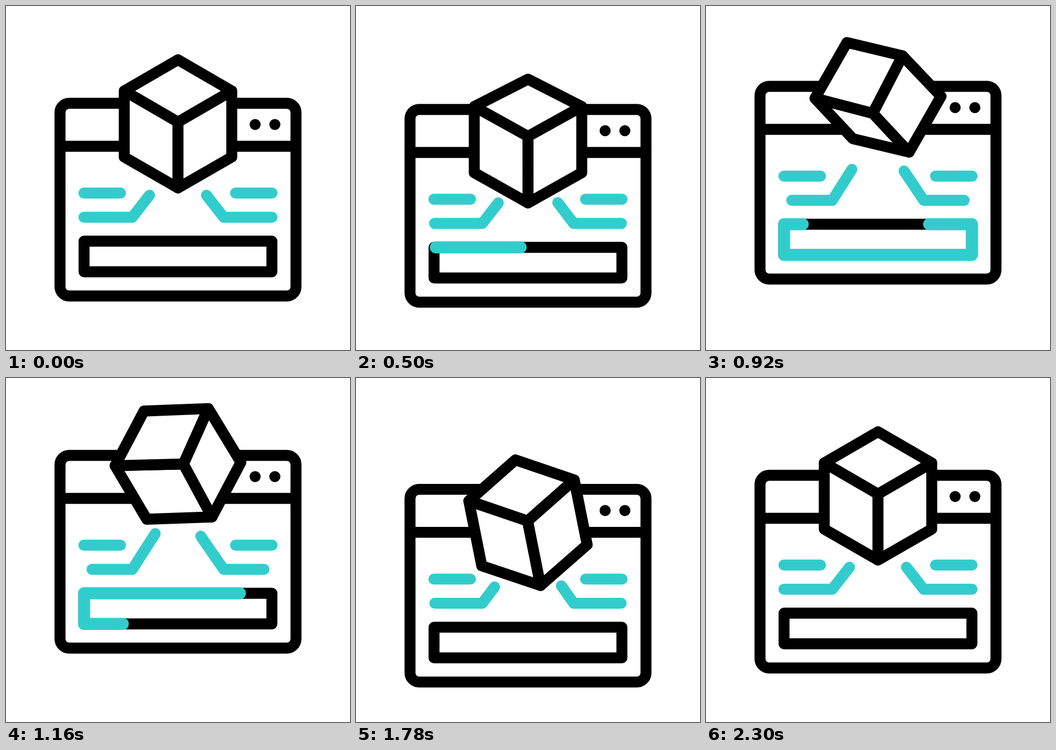
These frames come from a looping animation (640 by 640 pixels, 2800 ms). An HTML page with a canvas:

```html
<!DOCTYPE html>
<html lang="en">
<head>
<meta charset="utf-8">
<title>Jumping cube</title>
<style>
  html, body { margin: 0; width: 100%; height: 100%; overflow: hidden; background: #fff; }
  canvas { display: block; width: 640px; height: 640px; }
</style>
</head>
<body>
<canvas id="stage" width="640" height="640"></canvas>
<script>
const ctx = document.getElementById('stage').getContext('2d');
const LOOP = 2800, STEP = 20, BLACK = '#000', TEAL = '#33cccc', THICK = 20.4;
const lerp = (a, b, k) => a + (b - a) * k;
const part = (t, from, to) => Math.min(1, Math.max(0, (t - from) / (to - from)));
const ramp = (t, from, to) => (1 - Math.cos(Math.PI * part(t, from, to))) / 2;
const launch = (t, from) => 1 - Math.exp(-Math.max(0, t - from) / 232);

// Crouch, leap, hang, drop, dip and rest; lag delays the turning points
function hop(t, low, high, dip, lag) {
  const leap = low + high;
  return low * ramp(t, 200, 410 + lag)
    - leap * launch(t, 410 + lag)
    + leap * ramp(t, 1480 + lag, 1700 + lag)
    - (low + dip) * ramp(t, 1700 + lag, 1970 + lag)
    + dip * ramp(t, 1970 + lag, 2300);
}

const windowY = t => hop(t, 36, 40, 14, 0);
const cubeY = t => hop(t, 57, 65, 33, 30);
const pitch = t => ramp(t, 430, 1160) - ramp(t, 1240, 1650);
const roll = t => 32 * ramp(t, 530, 1000) - 16.5 * ramp(t, 1000, 1480)
  - 26.8 * ramp(t, 1480, 1780) + 11.3 * ramp(t, 1780, 2300);
const reach = t => -.15 * ramp(t, 200, 380) + 1.15 * ramp(t, 380, 1260)
  - 1.42 * ramp(t, 1480, 1740) + .42 * ramp(t, 1740, 2000);
const trim = t => 15 * (ramp(t, 400, 980) - ramp(t, 1480, 1860));

function line(points, color, width, closed, fill) {
  ctx.beginPath();
  points.forEach(p => ctx.lineTo(...p));
  if (closed) ctx.closePath();
  if (fill) { ctx.fillStyle = fill; ctx.fill(); }
  ctx.strokeStyle = color;
  ctx.lineWidth = width;
  ctx.stroke();
}

function drawWindow() {
  ctx.strokeStyle = ctx.fillStyle = BLACK;
  ctx.lineWidth = THICK;
  ctx.beginPath();
  ctx.roundRect(100.5, 181, 439, 358.5, 17);
  ctx.stroke();
  line([[101, 261], [539, 261]], BLACK, THICK);
  for (const x of [463.5, 500.2]) {
    ctx.beginPath();
    ctx.arc(x, 220.5, 10.3, 0, 7);
    ctx.fill();
  }
}

function drawRays(t) {
  const q = reach(t), cut = trim(t), dx = q < 0 ? 23 * q : 11.5 * q * q;
  for (const side of [-1, 1]) {
    const ray = (...points) => line(points.map(([x, y]) => [320 + side * x, y]), TEAL, THICK);
    ray([175, 348], [107, 348]);
    ray([175 - cut, 393], [85, 393], [53 - dx, 352 - (24 - 2.5 * side) * q]);
  }
}

// The teal runner travels clockwise round the bar
function drawBar(t) {
  const x = 145.2, y = 437.5, w = 349.5, h = 57, around = 2 * (w + h);
  const at = s => {
    s %= around;
    if (s < w) return [x + s, y];
    if (s < w + h) return [x + w, y + s - w];
    if (s < 2 * w + h) return [x + 2 * w + h - s, y + h];
    return [x, y + around - s];
  };
  const corners = [0, w, w + h, 2 * w + h];
  line(corners.map(at), BLACK, THICK, true);

  const tail = 1221 * part(t, 420, 1365) ** 2.37;
  const head = 1221 * (1 - (1 - part(t, 420, 1400)) ** 1.66);
  if (head - tail < 1) return;
  const passed = [...corners, ...corners.map(s => s + around)].filter(s => s > tail && s < head);
  line([tail, ...passed, head].map(at), TEAL, 22.6);
}

// Pitching swaps the top face for the bottom face
function drawCube(t) {
  const m = pitch(t);
  const mix = (a, b, k) => [lerp(a[0], b[0], k), lerp(a[1], b[1], k)];
  const side = (x, y) => mix([100 * x, 61.5 * y], [102 * x, 57.5 * y], m ** 3);
  const ul = side(-1, -1), ur = side(1, -1), lr = side(1, 1), ll = side(-1, 1);
  const nearTop = mix([0, -3.5], [1.7, -117.5], m);
  const backTop = mix([0, -119.5], [0, 0], m ** .75);
  const nearBottom = mix([0, 119], [9, -4.7], m ** 1.2);
  const backBottom = mix([0, 3.5], [-3.4, 118], m);

  ctx.save();
  ctx.translate(320, 219.5 + cubeY(t));
  ctx.rotate(roll(t) * Math.PI / 180);
  const face = (...points) => line(points, BLACK, THICK, true, '#fff');
  if (nearTop[1] > backTop[1]) face(ul, nearTop, ur, backTop);
  if (backBottom[1] > nearBottom[1]) face(ll, nearBottom, lr, backBottom);
  face(ul, nearTop, nearBottom, ll);
  face(nearTop, ur, lr, nearBottom);
  ctx.restore();
}

function draw(now) {
  const t = Math.floor(now % LOOP / STEP) * STEP;
  ctx.fillStyle = '#fff';
  ctx.fillRect(0, 0, 640, 640);
  ctx.lineCap = ctx.lineJoin = 'round';
  ctx.save();
  ctx.translate(0, windowY(t));
  drawWindow();
  drawRays(t);
  drawBar(t);
  ctx.restore();
  drawCube(t);
}

const start = performance.now();
function tick() {
  draw(performance.now() - start);
  requestAnimationFrame(tick);
}
tick();
</script>
</body>
</html>
```
